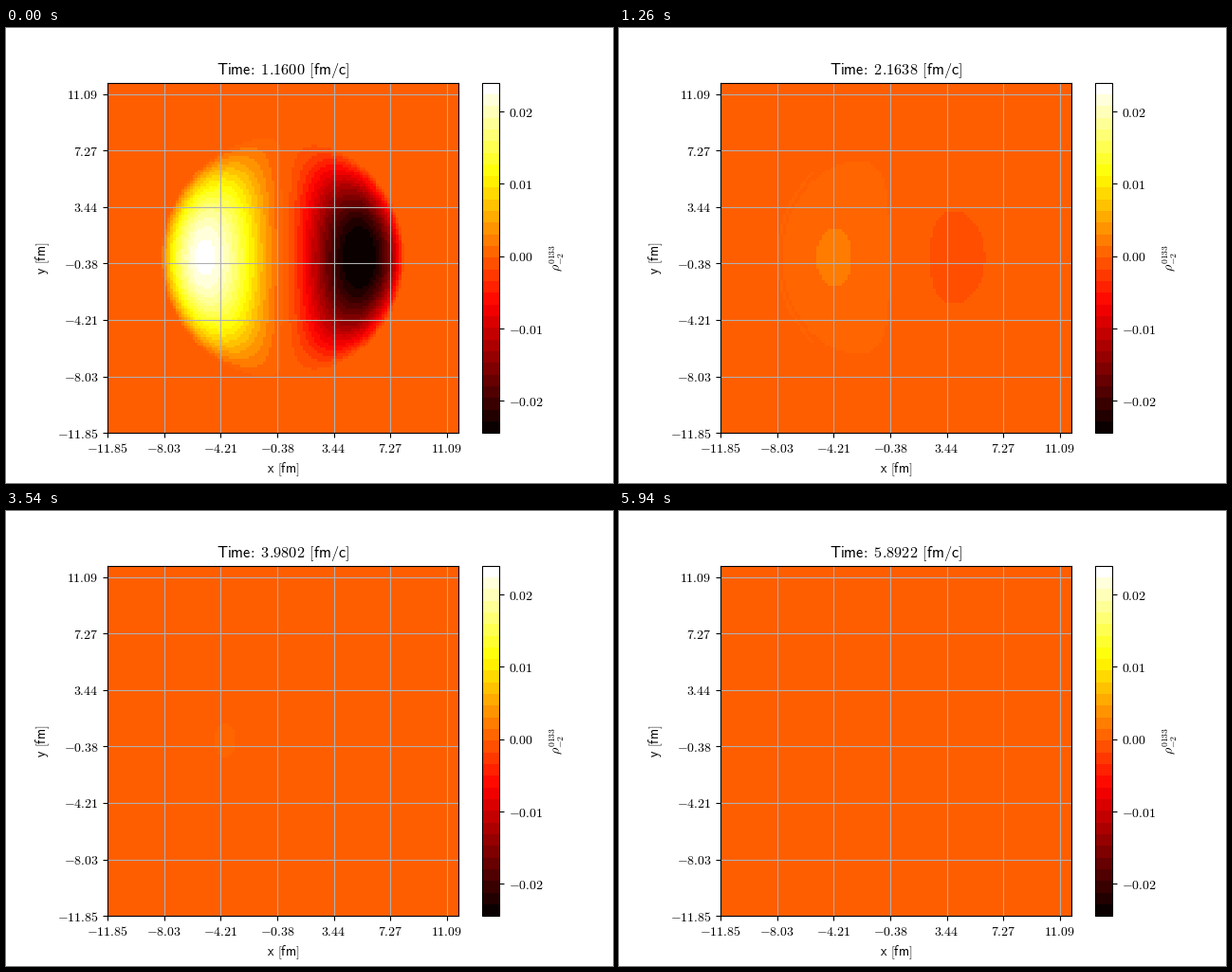
Animation, 640 px wide and 480 px high, one loop 6000 ms. Source, as a matplotlib script:

```python
import numpy as np
import matplotlib as mpl
import matplotlib.pyplot as plt
from matplotlib.animation import FuncAnimation
from matplotlib.cm import ScalarMappable
from matplotlib.colors import Normalize

plt.rcParams["mathtext.fontset"] = "cm"

FRAMES, INTERVAL = 100, 60
T0, DT = 1.16, 0.0478
HALF, CELLS, RADIUS = 11.85, 124, 8.25
VMIN, VMAX = -0.02444, 0.0240

# Key values over time: peak height, falloff power, rim height
KEY_T = [1.16, 1.351, 1.734, 2.164, 3.263, 4.697, 5.9]
PEAK = [0.0245, 0.0125, 0.0048, 0.0016, 0.00025, 0.00005, 0.00001]
POWER = [1.03, 1.1, 1.45, 2.0, 2.4, 2.4, 2.4]
RIM = [0, 0, 0.3, 0.3, 0.62, 0, 0]
INNER = 1.4

hot = mpl.colormaps["hot"].resampled(30)
steps = hot(np.arange(30))[:, :3]
REST = np.array([[255, 94, 0]]) / 255
COLORS = np.vstack([steps[:15], REST, steps[15:]])
EDGES = np.r_[np.linspace(VMIN, -0.0011, 16)[1:], 0.0001,
              np.linspace(0.0013, VMAX, 15)[:-1]]

axis = (np.arange(CELLS) + 0.5) * 2 * HALF / CELLS - HALF
X, Y = np.meshgrid(axis / RADIUS, axis / RADIUS)
R = np.hypot(X, Y)
COS = np.abs(X) / R
FALLOFF = np.clip(1 - R**2, 0, None)
ON_RIM = (R > 0.955) & (R < 0.98) & (COS > 0.69)
GAIN = np.where(X < 0, 0.95, -1.05)


def field(t):
    peak = np.exp(np.interp(t, KEY_T, np.log(PEAK)))
    p = np.interp(t, KEY_T, POWER)
    top2 = INNER / (INNER + 2 * p)
    norm = top2 ** (INNER / 2) * (1 - top2) ** p
    lobe = np.abs(X) ** INNER * FALLOFF**p / norm
    rim = np.interp(t, KEY_T, RIM) * COS * ON_RIM
    return GAIN * peak * np.maximum(lobe, rim)


def picture(t):
    return COLORS[np.digitize(field(t), EDGES)]


def sans(text):
    return rf"$\mathsf{{{text}}}$"


def roman(text):
    return rf"$\mathrm{{{text}}}$"


def title_text(t):
    return sans(rf"Time\hspace{{-0.2}}:\hspace{{0.3}}{t:.4f}\hspace{{0.38}}[fm/c]")


fig, ax = plt.subplots(figsize=(6.4, 4.8), dpi=100)
image = ax.imshow(picture(T0), origin="lower", interpolation="nearest",
                  extent=(-HALF, HALF, -HALF, HALF))

ticks = -HALF + np.arange(7) * 20 * 2 * HALF / CELLS
labels = [roman(s) for s in
          "-11.85 -8.03 -4.21 -0.38 3.44 7.27 11.09".split()]
ax.set_xticks(ticks, labels)
ax.set_yticks(ticks, labels)
ax.grid(True)
ax.set_xlabel(sans(r"x\hspace{0.38}[fm]"))
ax.set_ylabel(sans(r"y\hspace{0.38}[fm]"))
title = ax.set_title(title_text(T0), fontsize=11.75)

bar = fig.colorbar(ScalarMappable(Normalize(VMIN, VMAX), hot), ax=ax)
levels = [-0.02, -0.01, 0, 0.01, 0.02]
bar.set_ticks(levels, labels=[roman(f"{v:.2f}") for v in levels])
bar.set_label(r"$\rho^{0133}_{-2}$")


def update(i):
    t = T0 + i * DT
    image.set_data(picture(t))
    title.set_text(title_text(t))
    return image, title


anim = FuncAnimation(fig, update, frames=FRAMES, interval=INTERVAL,
                     repeat=True, repeat_delay=0, blit=False)
plt.show()
```
